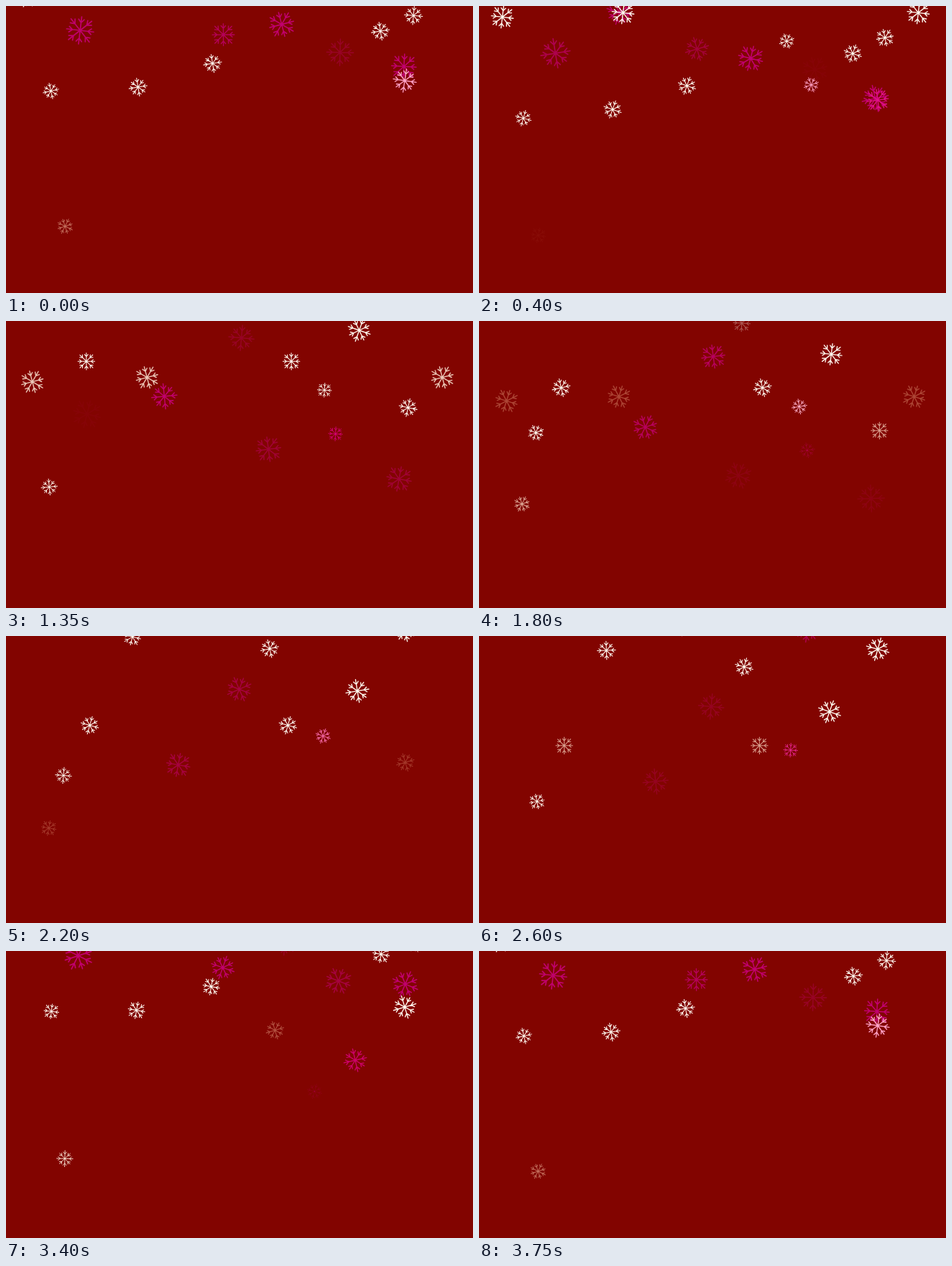
An HTML page that plays this animation: 650x400 px, repeating every 3800 ms.

```html
<!DOCTYPE html>
<html lang="en">
<head>
<meta charset="utf-8">
<title>Snowfall</title>
<style>
  html, body { margin: 0; width: 100%; height: 100%; overflow: hidden; background: #820400; }
  svg { display: block; width: 650px; height: 400px; }
</style>
</head>
<body>
<svg id="stage" viewBox="0 0 650 400" fill="none" stroke-linecap="round"></svg>
<script>
// Times are in seconds; the picture advances in steps and rests for one step at the seam
const LOOP = 3.8, STEP = 0.05, CYCLE = LOOP - STEP;
const SPIN = 72, UPRIGHT = 0.43, FADE_IN = 0.15;
const stage = document.getElementById('stage');
const flakes = [];

// Colour ramps run from fresh to faded: [r, g, b, opacity]
const WHITE = [255, 250, 240, 1];
const warm = [WHITE, [255, 174, 120, 0]];
const pink = [WHITE, [255, 128, 184, 1], [224, 0, 132, 0.95], [200, 0, 124, 0]];
const magenta = [[200, 0, 124, 0.9], [200, 0, 124, 0]];

// speed: px/s at the fastest point; w: how quickly the fall eases in and out;
// lead: time from birth to the fastest point; fade: length of the colour ramp
const kinds = {
  small: { r: 11.5, speed: 98, w: 0.55, lead: 0.35, fade: 0.9, ramp: warm },
  mid:   { r: 13, speed: 82, w: 0.62, lead: 1.2, fade: 0.95, ramp: warm },
  quick: { r: 13, speed: 88, w: 0.95, lead: 1.45, fade: 0.9, ramp: warm },
  big:   { r: 17, speed: 76, w: 0.62, lead: 1.15, fade: 0.9, ramp: warm },
  blush: { r: 16.5, speed: 76, w: 0.62, lead: 1.15, fade: 1.05, ramp: pink },
  tiny:  { r: 10.8, speed: 51, w: 0.3, lead: 1.4, fade: 2.1, ramp: pink },
  berry: { r: 19, w: 0.7, lead: 0.8, fade: 1.5, ramp: magenta }
};

// Unit snowflake: eight arms, each with a small V near its tip
function flakePath() {
  let d = '';
  for (let i = 0; i < 8; i++) {
    const a = i * Math.PI / 4, len = i % 2 ? 0.92 : 1;
    const at = (u, v) => [u * Math.cos(a) - v * Math.sin(a), u * Math.sin(a) + v * Math.cos(a)]
      .map(n => (n * len).toFixed(3)).join(' ');
    d += `M0 0L${at(0.98, 0)}M${at(0.8, -0.2)}L${at(0.56, 0)}L${at(0.8, 0.2)}`;
  }
  return d;
}
const SHAPE = flakePath();

// (x, y) is the place at time peak, the fastest point of the fall; lean is sideways px per px fallen
function flake(kind, x, y, peak, lean, fadeAt, extra) {
  const el = document.createElementNS('http://www.w3.org/2000/svg', 'path');
  el.setAttribute('d', SHAPE);
  el.setAttribute('stroke-width', 0.082);
  stage.appendChild(el);
  flakes.push({ el, x, y, peak, lean, fadeAt, sway: 0, ...kinds[kind], ...extra });
}

flake('berry', 104, 42, 3.85, 0.1, 3.7, { r: 21, speed: 80 });
flake('berry', 303, 50, 3.95, 0.05, 3.45, { r: 17, speed: 50 });
flake('berry', 378, 73, 4.15, -0.12, 4.3, { speed: 120 });
flake('berry', 462, 35, 3.3, 0.1, 2.75, { speed: 67 });
flake('berry', 553, 101, 3.9, -0.05, 4.3, { speed: 112 });
flake('berry', 211, 69, 1, 0.26, 1.55, { r: 18, speed: 104 });
flake('berry', 325, 68, 2.1, -0.06, 1.55, { r: 18, speed: 62 });

flake('blush', 490, 54, 1.9, -0.04, 2.65);
flake('blush', 555, 63, 3.2, 0, 3.5);
flake('tiny', 437, 104, 1.5, 0, 1.4, { sway: 9 });
flake('tiny', 458, 165, 1.5, -0.08, -0.1);

flake('small', 63, 94, 3.5, -0.02, 5.3);
flake('small', 79, 146, 1.7, 0.02, 3.3);

for (const [x, y, lean] of [[33, 23, 0.06], [200, 17, -0.06], [611, 17, -0.06]])
  flake('big', x, y, 0.5, lean, 1.2);

for (const [x, peak, lean] of [[113, 1.55, 0.07], [396, 1.55, -0.07], [563, 4.5, -0.07]])
  flake('mid', x, 72.6, peak, lean, peak + 0.75);

for (const [x, y, lean] of [[522, 9, -0.03], [182, 87, 0.07], [286, 54, 0.06]])
  flake('quick', x, y, 3.45, lean, 4.15);
flake('quick', 373, 93, 3.2, 0.08, 2.85);

const clamp = v => Math.min(1, Math.max(0, v));

function rampAt(ramp, u) {
  const p = u * (ramp.length - 1), i = Math.min(Math.floor(p), ramp.length - 2);
  return ramp[i].map((c, k) => c + (ramp[i + 1][k] - c) * (p - i));
}

function draw(now) {
  const t = now % CYCLE;
  for (const f of flakes) {
    const born = f.peak - f.lead;
    const at = [t, t + CYCLE].find(v => v >= born && v < f.fadeAt + f.fade);
    f.el.style.display = at === undefined ? 'none' : '';
    if (at === undefined) continue;
    const age = at - f.peak;
    const fall = f.speed / f.w * Math.sin(f.w * age);
    const x = f.x + f.lean * fall + f.sway * Math.sin(2.2 * (age + 0.5));
    const [r, g, b, a] = rampAt(f.ramp, clamp((at - f.fadeAt) / f.fade));
    f.el.setAttribute('transform',
      `translate(${x} ${f.y + fall}) rotate(${(age - UPRIGHT) * SPIN}) scale(${f.r})`);
    f.el.setAttribute('stroke', `rgb(${Math.round(r)},${Math.round(g)},${Math.round(b)})`);
    f.el.setAttribute('opacity', a * clamp((at - born) / FADE_IN));
  }
}

const start = performance.now();
function tick() {
  const ms = Math.max(0, performance.now() - start) % (LOOP * 1000);
  draw(Math.floor(ms / (STEP * 1000)) * STEP);
  requestAnimationFrame(tick);
}
tick();
</script>
</body>
</html>
```
